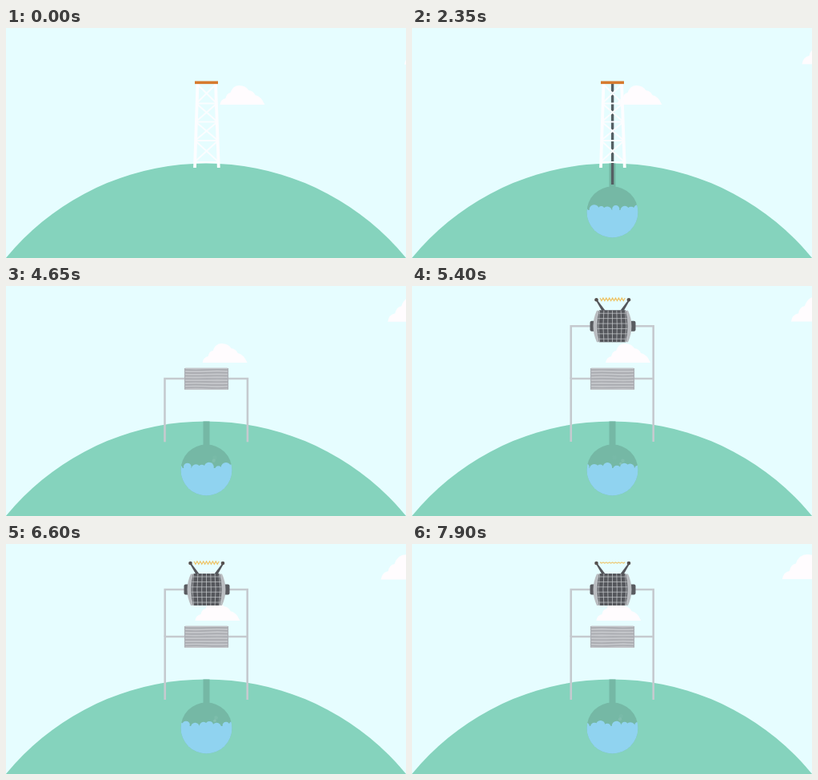
Animation, 500 px wide and 288 px high, one loop 7.95 s. Source, as an HTML page:

```html
<!DOCTYPE html>
<html lang="en">
<head>
<meta charset="utf-8">
<title>Underground energy</title>
<style>
html, body { margin: 0; width: 100%; height: 100%; overflow: hidden; background: #e6fdff; }
svg { display: block; width: 100vw; height: 100vh; }
</style>
</head>
<body>
<svg viewBox="0 0 500 288" xmlns="http://www.w3.org/2000/svg">
  <defs>
    <path id="cloud" fill="#fffcfe" d="M0 24Q1 17 7 16Q8 10 13 9Q16 0 24 0Q32 0 36 6Q42 7 44 12Q51 13 56 24Z"/>
    <linearGradient id="fade" x1="0" y1="0" x2="0" y2="1">
      <stop offset=".97" stop-color="#fff"/><stop offset="1" stop-color="#000"/>
    </linearGradient>
    <mask id="reveal" maskUnits="userSpaceOnUse" x="200" y="60" width="100" height="220">
      <rect id="revealBox" x="200" y="60" width="100" height="0" fill="url(#fade)"/>
    </mask>
    <clipPath id="caveClip"><circle cx="250.5" cy="230.5" r="32"/></clipPath>
    <clipPath id="gridClip"><path id="gridShape" d="M234 37H267Q272 57 267 77H234Q229 57 234 37Z"/></clipPath>
  </defs>
  <rect width="500" height="288" fill="#e6fdff"/>
  <use id="nearCloud" href="#cloud"/>
  <use id="farCloud" href="#cloud"/>
  <circle cx="250" cy="492.5" r="323" fill="#85d3bd"/>

  <g mask="url(#reveal)">
    <rect id="tunnel" x="246.5" y="169.5" width="8" height="0" fill="#75b8a5"/>
    <g id="cave">
      <circle cx="250.5" cy="230.5" r="32" fill="#75b8a5"/>
      <g clip-path="url(#caveClip)">
        <g id="steam" fill="#a5d3c9"></g>
        <path id="water" fill="#90d3f0"/>
      </g>
    </g>
  </g>

  <g id="rig">
    <path id="drill" stroke="#555f63" stroke-width="3.4"/>
    <path id="braces" fill="none" stroke="#fbfdff" stroke-width="2"/>
    <path d="M239.500 69L236 175M262 69L265.800 175" stroke="#fdfdff" stroke-width="3.800"/>
    <rect x="236" y="66.500" width="29" height="3.600" fill="#d67a2e"/>
  </g>

  <path id="lowerPipes" d="M224 116H198.700V195M277 116H301.700V195" fill="none" stroke="#c5cacf" stroke-width="2.600"/>
  <g id="radiator">
    <rect x="223" y="102.500" width="55" height="27.500" rx="1.500" fill="#c3c5c9"/>
    <path id="fins" fill="none" stroke="#a6a8ad" stroke-width="1.300"/>
    <path d="M223.500 103V129.500M277.500 103V129.500" stroke="#adb0b5" stroke-width="1.200"/>
  </g>

  <g id="upper">
    <path id="upperPipes" fill="none" stroke="#c5cacf" stroke-width="2.600"/>
    <g id="reactor">
      <path d="M238 39L230 25L231.500 24L242 38ZM264 39L272 25L270.500 24L260 38Z" fill="#55575c"/>
      <g fill="#56514f"><circle cx="230.500" cy="24" r="2.300"/><circle cx="271" cy="24" r="2.300"/></g>
      <rect x="222.500" y="50.500" width="7" height="13" rx="2" fill="#595b60"/>
      <rect x="272.500" y="50.500" width="7" height="13" rx="2" fill="#595b60"/>
      <path d="M231 37.500H270Q279 57 270 77H231Q222 57 231 37.500Z" fill="#b9bcc0"/>
      <use href="#gridShape" fill="#55575c"/>
      <path id="grid" clip-path="url(#gridClip)" fill="none" stroke="#c9cccf" stroke-width=".7"/>
      <path id="spark" fill="none" stroke="#eec365" stroke-width="1.200"/>
    </g>
  </g>
</svg>
<script>
const LOOP = 7950;
const $ = id => document.getElementById(id);
const set = (id, name, value) => $(id).setAttribute(name, value);
const show = (id, on) => set(id, 'display', on ? 'inline' : 'none');
const range = n => Array.from({ length: n }, (_, i) => i);
const progress = (t, start, length) => Math.min(1, Math.max(0, (t - start) / length));
const backIn = p => p * p * (2.70158 * p - 1.70158);
const backOut = p => 1 - backIn(1 - p);
const smooth = p => p * p * (3 - 2 * p);

function scaleAt(id, x, y, s) {
  show(id, s > 0.001);
  set(id, 'transform', `translate(${x} ${y}) scale(${s}) translate(${-x} ${-y})`);
}

// Fixed lattice of the tower and panel lines of the reactor
const levels = [70, 94.5, 117.5, 141, 168];
const legX = y => 12 + (y - 70) * 0.033;
set('braces', 'd', levels.slice(1).map((y, i) => {
  const top = levels[i], a = legX(top), b = legX(y);
  return `M${250.7 - a} ${top}L${250.7 + b} ${y}M${250.7 + a} ${top}L${250.7 - b} ${y}M${250.7 - b} ${y}h${2 * b}`;
}).join(''));
set('grid', 'd',
  range(6).map(i => `M228 ${41 + i * 6.4}H273`).join('') +
  range(7).map(i => {
    const k = i - 3;
    return `M${250.5 + k * 5.3} 37Q${250.5 + k * 6.3} 57 ${250.5 + k * 5.3} 77`;
  }).join(''));
$('steam').innerHTML = '<circle/>'.repeat(3);

function waterPath(t) {
  const bumps = range(8).map(i => {
    const x = 217 + i * 9.5 + 1.5 * Math.sin(t / 420 + i * 1.7);
    const y = 228 + 1.5 * Math.sin(t / 310 + i * 2.3);
    const r = 5.2 + Math.sin(t / 500 + i * 2.9);
    return `M${x - r} ${y}a${r} ${r} 0 1 1 ${2 * r} 0a${r} ${r} 0 1 1 ${-2 * r} 0Z`;
  });
  return 'M215 228H286V265H215Z' + bumps.join('');
}

function drawSteam(t) {
  [...$('steam').children].forEach((puff, i) => {
    const p = (t / 1100 + i / 3) % 1;
    puff.setAttribute('cx', 255 + i * 4 + 2 * Math.sin(p * 5));
    puff.setAttribute('cy', 225 - p * 11);
    puff.setAttribute('r', 1.2 + 1.8 * p);
    puff.setAttribute('opacity', t > 4450 ? 0.5 * (1 - p) : 0);
  });
}

function draw(t) {
  const s = t / 1000;
  set('nearCloud', 'transform', `translate(${267.5 - 4.7 * s} 72)`);
  set('farCloud', 'transform', `translate(${498 - 4.45 * s} ${14.5 - 0.2 * s}) scale(1.3)`);

  const tip = 70 + 126 * smooth(progress(t, 430, 470));
  show('drill', tip > 70);
  set('drill', 'd', `M250.600 70V${tip}`);
  set('tunnel', 'height', Math.max(0, Math.min(200, tip + 4) - 169.5));
  show('tunnel', tip > 169);
  show('cave', t > 880);
  const edge = t < 900 ? 205 : 205 + 72 * progress(t, 950, 870);
  set('revealBox', 'height', edge - 60);
  set('water', 'd', waterPath(t));
  drawSteam(t);

  scaleAt('rig', 250.6, 131, 1 - backIn(progress(t, 3630, 390)));
  scaleAt('radiator', 250.5, 116, backOut(progress(t, 4020, 380)));
  scaleAt('lowerPipes', 250.2, 116, backOut(progress(t, 4405, 260)));
  set('fins', 'd', range(7).map(i => {
    const y = 105 + i * 3.75, sway = 0.6 * Math.sin(t / 330 + i * 0.5);
    return `M224 ${y}Q237 ${y + sway} 250.500 ${y}T277 ${y}`;
  }).join(''));

  const lift = 80 * (1 - progress(t, 4840, 1000)) ** 3;
  const top = 57 - lift, foot = Math.min(116, 130 - 1.93 * lift);
  show('upper', t > 4840);
  set('reactor', 'transform', `translate(0 ${-lift})`);
  set('upperPipes', 'd', `M224 ${top}H198.700V${foot}M278 ${top}H301.700V${foot}`);

  const beat = Math.floor(t / 50);
  const swing = 1.2 + 0.6 * Math.sin(beat * 1.3);
  set('spark', 'd', 'M' + range(17).map(i =>
    `${235 + i * 1.95} ${23.5 + ((i + beat) % 2 ? swing : -swing)}`).join('L'));
}

const begin = performance.now();
function tick() {
  draw((performance.now() - begin) % LOOP);
  requestAnimationFrame(tick);
}
draw(0);
requestAnimationFrame(tick);
</script>
</body>
</html>
```
